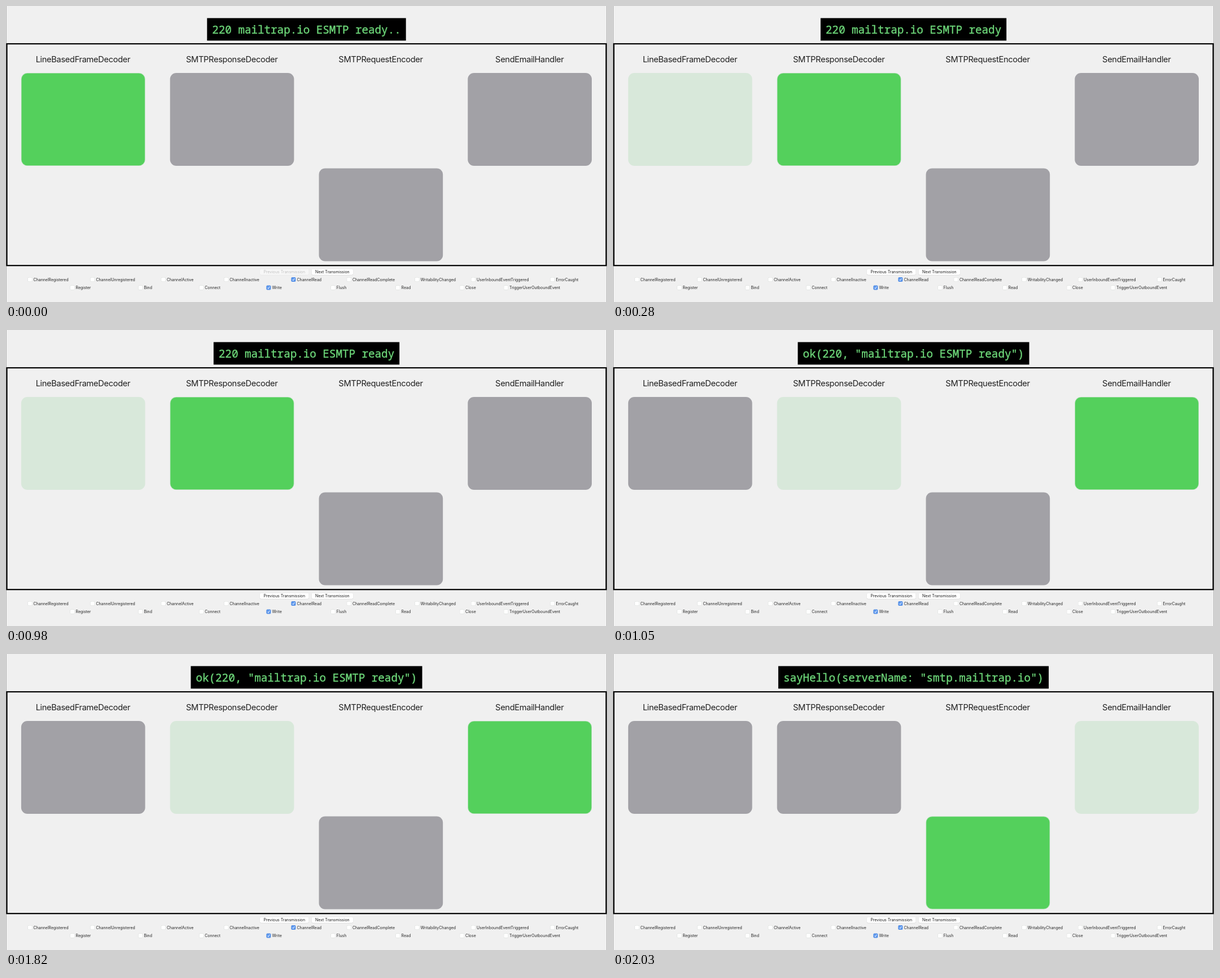
An HTML page with a canvas that plays this animation: 1065 by 526 pixels, repeating every 2730 ms.

```html
<!DOCTYPE html>
<html lang="en">
<head>
<meta charset="utf-8">
<title>Channel pipeline</title>
<style>
  html, body { margin: 0; width: 100%; height: 100%; overflow: hidden; background: #f0f0f0; }
  canvas { display: block; width: 1065px; height: 526px; }
</style>
</head>
<body>
<canvas id="stage" width="1065" height="526"></canvas>
<script>
const ctx = document.getElementById("stage").getContext("2d");
const LOOP = 2730;
const SANS = "Inter, Roboto, sans-serif";
const MONO = '"Noto Sans Mono", "DejaVu Sans Mono", monospace';

const COLORS = { idle: "#a2a1a6", active: "#54d05c", done: "#d8e8da" };

const CARDS = [
  { title: "LineBasedFrameDecoder", y: 119 },
  { title: "SMTPResponseDecoder", y: 119 },
  { title: "SMTPRequestEncoder", y: 288.6 },
  { title: "SendEmailHandler", y: 119 }
];

const STEPS = [
  { at: 0, message: "220 mailtrap.io ESMTP ready..", active: 0, done: -1 },
  { at: 210, message: "220 mailtrap.io ESMTP ready", active: 1, done: 0 },
  { at: 1050, message: 'ok(220, "mailtrap.io ESMTP ready")', active: 3, done: 1 },
  { at: 1890, message: 'sayHello(serverName: "smtp.mailtrap.io")', active: 2, done: 3 }
];

const EVENT_ROWS = [
  { y: 486, events: [
    ["ChannelRegistered", 42.5], ["ChannelUnregistered", 153.3], ["ChannelActive", 278.8],
    ["ChannelInactive", 390.2], ["ChannelRead", 509.4, true], ["ChannelReadComplete", 607.8],
    ["WritabilityChanged", 728.4], ["UserInboundEventTriggered", 828], ["ErrorCaught", 968.3]
  ] },
  { y: 500.5, events: [
    ["Register", 117.5], ["Bind", 238.3], ["Connect", 346.2], ["Write", 465.4, true],
    ["Flush", 579.5], ["Read", 694.5], ["Close", 808], ["TriggerUserOutboundEvent", 886]
  ] }
];

function fillRound(x, y, w, h, radius, color) {
  ctx.beginPath();
  ctx.roundRect(x, y, w, h, radius);
  ctx.fillStyle = color;
  ctx.fill();
}

function write(text, x, y, font, color, align = "left", spacing = "0px") {
  ctx.font = font;
  ctx.fillStyle = color;
  ctx.textAlign = align;
  ctx.letterSpacing = spacing;
  ctx.fillText(text, x, y);
}

function drawBanner(message) {
  const font = `500 19.23px ${MONO}`;
  const color = "#6cd578";
  ctx.font = font;
  ctx.letterSpacing = "0px";
  const width = ctx.measureText(message).width + 18;
  ctx.fillStyle = "#000";
  ctx.fillRect(532.5 - width / 2, 21.5, width, 40);
  write(message, 532.5, 48.8, font, color, "center");
  // A hairline outline gives the text a medium weight.
  ctx.strokeStyle = color;
  ctx.lineWidth = 0.4;
  ctx.strokeText(message, 532.5, 48.8);
}

function drawFrame() {
  ctx.fillStyle = "#a6a6a6";
  ctx.fillRect(0, 0, 0.8, 526);
  ctx.fillRect(1064.2, 0, 0.8, 526);
  ctx.strokeStyle = "#000";
  ctx.lineWidth = 2.2;
  ctx.strokeRect(1.5, 67.2, 1062, 394);
}

function drawCard({ title, y }, index, step) {
  const x = 26.9 + index * 263.8;
  const state = index === step.active ? "active" : index === step.done ? "done" : "idle";
  if (state === "active") {
    fillRound(x, y, 219.7, 164.9, 11, "#a9dfae");
    fillRound(x + 0.7, y + 0.7, 218.3, 163.5, 10.3, COLORS.active);
  } else {
    fillRound(x, y, 219.7, 164.9, 11, COLORS[state]);
  }
  write(title, x + 109.5, 100.1, `14.65px ${SANS}`, "#202020", "center", "-0.34px");
}

function drawButton(label, x, width, enabled) {
  fillRound(x - 0.3, 467.5, width + 0.6, 10.9, 2.5, enabled ? "#d9d9d9" : "#e8e8e8");
  fillRound(x, 467.4, width, 10.4, 2.3, enabled ? "#fff" : "#f7f7f7");
  write(label, x + width / 2, 475.4, `6.95px ${SANS}`, enabled ? "#1c1c1c" : "#c2c2c2", "center");
}

function drawCheckbox(label, x, y, checked) {
  fillRound(x - 4, y - 3.9, 8, 8, 1.8, checked ? "#4d86dc" : "#d6dad7");
  fillRound(x - 3.6, y - 3.6, 7.2, 7.2, 1.5, checked ? "#5b96ec" : "#fff");
  if (checked) {
    ctx.beginPath();
    ctx.moveTo(x - 1.9, y + 0.2);
    ctx.lineTo(x - 0.5, y + 1.9);
    ctx.lineTo(x + 1.9, y - 2);
    ctx.strokeStyle = "#fff";
    ctx.lineWidth = 1;
    ctx.stroke();
  }
  write(label, x + 6.1, y + 2.8, `6.95px ${SANS}`, "#252525");
}

function draw(time) {
  const step = STEPS.findLast(({ at }) => at <= time);
  ctx.fillStyle = "#f0f0f0";
  ctx.fillRect(0, 0, 1065, 526);
  drawFrame();
  drawBanner(step.message);
  CARDS.forEach((card, index) => drawCard(card, index, step));
  drawButton("Previous Transmission", 450, 86.5, step !== STEPS[0]);
  drawButton("Next Transmission", 541.7, 73.3, true);
  for (const { y, events } of EVENT_ROWS) {
    for (const [label, x, checked] of events) drawCheckbox(label, x, y, checked);
  }
}

const start = performance.now();
function tick() {
  draw((performance.now() - start) % LOOP);
  requestAnimationFrame(tick);
}
tick();
</script>
</body>
</html>
```
